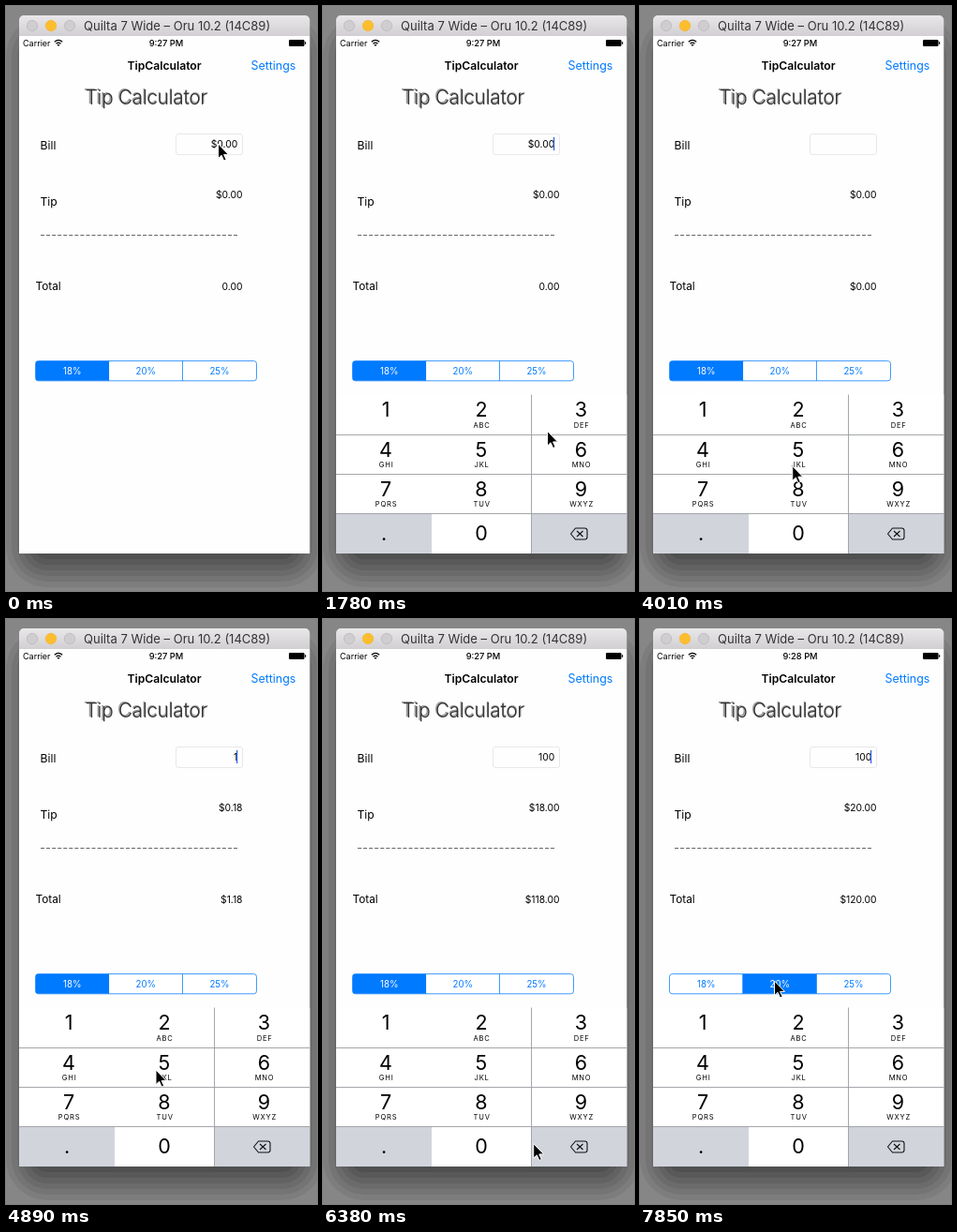
An HTML page for the animation above (8 s loop, 332 by 624 pixels).

```html
<!DOCTYPE html>
<html lang="en">
<head>
<meta charset="utf-8">
<title>Tip Calculator</title>
<style>
  html, body { margin: 0; width: 100%; height: 100%; overflow: hidden; background: #868686; }
  svg { display: block; width: 332px; height: 624px; font-family: Inter, Roboto, sans-serif; }
  .end { text-anchor: end; }
  .mid { text-anchor: middle; }
</style>
</head>
<body>
<svg id="stage" viewBox="0 0 332 624"></svg>
<script>
const LOOP = 8000, START = 600, TICK = 147.96;
const BLUE = '#007aff', KEY_GRAY = '#d1d4db';

const text = (x, y, size, str, attrs = '') =>
  `<text x="${x}" y="${y}" font-size="${size}" ${attrs}>${str}</text>`;
const rect = (x, y, w, h, fill, attrs = '') =>
  `<rect x="${x}" y="${y}" width="${w}" height="${h}" fill="${fill}" ${attrs}/>`;
const line = (d, stroke, attrs = '') =>
  `<path d="${d}" stroke="${stroke}" fill="none" ${attrs}/>`;

// Banded drop shadow around the window
function shadow() {
  let out = '';
  for (let k = 5; k >= 0; k--) {
    const s = 6 * k, g = 80 + 9 * k;
    out += rect(30 - s, 40 - s, 279 + 2 * s, 550 + 2 * s, `rgb(${g},${g},${g})`, `rx="${14 + s}"`);
  }
  return out;
}

function titleBar() {
  const lights = [[28, '#cfcdcf', '#b9b7b9'], [48, '#fdbe2e', '#f3b32c'], [68, '#cfcdcf', '#b9b7b9']];
  return `<path d="M14 32V15a5 5 0 0 1 5-5H319.3a5 5 0 0 1 5 5V32Z" fill="url(#bar)"/>` +
    lights.map(([x, fill, edge]) =>
      `<circle cx="${x}" cy="21" r="5.7" fill="${fill}" stroke="${edge}" stroke-width=".7"/>`).join('') +
    text(83, 25.7, 13, 'Quilta 7 Wide – Oru 10.2 (14C89)', 'fill="#333"');
}

function statusBar() {
  return text(18, 43, 9, 'Carrier') +
    line('M51.8 38.3Q56 34.6 60.2 38.3M53.5 40.2Q56 38 58.5 40.2', '#000', 'stroke-width="1.2"') +
    '<path d="M54.5 41.3Q56 40.2 57.5 41.3L56 43Z"/>' +
    text(171, 43, 9.3, '', 'id="clock" class="mid" font-weight="500"') +
    rect(302, 36, 16.5, 7, '#000', 'rx="1.2"') + rect(319, 38.3, 1.2, 2.4, '#000');
}

function page() {
  const title = (x, y, attrs) => text(x, y, 20.8, 'Tip Calculator', `letter-spacing="-.3" ${attrs}`);
  return text(169, 68, 12.2, 'TipCalculator', 'class="mid" font-weight="600"') +
    text(309.3, 68, 12.4, 'Settings', `class="end" fill="${BLUE}"`) +
    title(82.9, 104, 'fill="#9c9c9c"') + title(84.7, 104.8, 'fill="#333" font-weight="300"') +
    text(36.5, 152.5, 12.2, 'Bill') + text(36.5, 212.7, 12.2, 'Tip') + text(31.5, 303, 11.8, 'Total') +
    rect(181.5, 136.5, 71, 22, '#fefefe', 'rx="2.5" stroke="#e8e8e8"') +
    text(247.3, 151, 10.3, '', 'id="bill" class="end"') +
    rect(246, 140, 1.2, 14, '#2d5fe6', 'id="caret"') +
    text(252.5, 205, 10.3, '', 'id="tip" class="end"') +
    text(252.5, 302.5, 10.3, '', 'id="total" class="end"') +
    line('M37 244.5H247', '#666', 'stroke-dasharray="4 2.06"');
}

const segments = [[31.5, 78.5, '18%'], [110, 78.5, '20%'], [188.5, 79, '25%']];
function segmentedControl() {
  return '<g clip-path="url(#segClip)">' +
    segments.map(([x, w], i) => rect(x, 378.6, w, 21.2, '#fff', `id="seg${i}"`)).join('') + '</g>' +
    rect(31.5, 378.6, 236, 21.2, 'none', `rx="3" stroke="${BLUE}" stroke-width=".75"`) +
    line('M109.6 378.6V399.8M188.5 378.6V399.8', BLUE, 'stroke-width=".75"') +
    segments.map(([x, w, s], i) => text(x + w / 2, 393, 9.7, s, `id="pct${i}" class="mid"`)).join('');
}

const letters = ['', 'ABC', 'DEF', 'GHI', 'JKL', 'MNO', 'PQRS', 'TUV', 'WXYZ'];
const columns = [[14, 102, 67], [116, 106.5, 169], [222.5, 102.5, 275.5]];
const keyFill = key => key === '.' || key === 'del' ? KEY_GRAY : '#fff';
const keys = ['1', '2', '3', '4', '5', '6', '7', '8', '9', '.', '0', 'del'];
function keyboard() {
  let out = '';
  keys.forEach((key, i) => {
    const [x, w, mid] = columns[i % 3], top = 414.5 + 42.3 * Math.floor(i / 3);
    out += rect(x, top, w, 42.8, keyFill(key), `id="key-${key}"`);
    if (key !== 'del') out += text(mid - (key === '.' ? 2 : 0), top + (i < 9 ? 23.7 : 29), 21.5, key, 'class="mid"');
    if (letters[i]) out += text(mid + .6, top + 35.2, 7.6, letters[i], 'class="mid" letter-spacing=".8"');
  });
  return out +
    line('M14 457.5H325M14 499.5H325M14 541.5H325M222.5 414.5V584', '#9b9da1', 'stroke-width=".9"') +
    line('M264.5 563L269.5 557H279.5Q282 557 282 559.5V566.5Q282 569 279.5 569H269.5ZM271 560L277.5 566M277.5 560L271 566',
      '#111', 'stroke-width="1.1" stroke-linejoin="round"');
}

document.getElementById('stage').innerHTML = `
  <defs>
    <linearGradient id="bar" x2="0" y2="1"><stop stop-color="#e9e7e9"/><stop offset="1" stop-color="#d1cfd1"/></linearGradient>
    <clipPath id="segClip"><rect x="31.5" y="378.6" width="236" height="21.2" rx="3"/></clipPath>
    <clipPath id="screen"><rect x="14" y="32" width="310.3" height="552"/></clipPath>
  </defs>
  ${rect(0, 0, 332, 624, '#868686')}${shadow()}${titleBar()}
  ${rect(14, 32, 310.3, 552, '#fefefe')}
  ${statusBar()}${page()}${segmentedControl()}
  <g clip-path="url(#screen)"><g id="keyboard">${keyboard()}</g></g>
  <path id="pointer" d="M0 0V15.6L3.6 12.3L6.1 18L8.6 16.9L6.1 11.4H11Z" stroke="#fff" stroke-width="1"/>`;

const tracks = {
  bill: [[-1, '$0.00'], [11, '$0.001'], [14, '$0.00'], [15, '$0.0'], [16, '$0.'], [17, '$0'],
    [18, '$'], [19, ''], [26, '1'], [33, '10'], [35, '100']],
  key: [[-1, ''], [14, 'del'], [15, ''], [16, 'del'], [17, ''], [18, 'del'], [20, ''],
    [25, '1'], [26, ''], [32, '0'], [33, ''], [34, '0'], [35, '']],
  slide: [[-1, 172], [0, 140], [1, 48], [2, 8], [3, 0]],
  clock: [[-1, '9:27 PM'], [42, '9:28 PM']],
};
const caretFlips = [0, 4, 7, 10, 11, 22, 25, 30, 32, 39, 42, 45, 48];
const pointerPath = [[-1, 226.5, 147], [3, 226.5, 147], [8, 239.5, 453.5], [11, 66, 434], [14, 257.5, 549.5],
  [21, 257.5, 549.5], [25, 68, 432], [26, 68, 432], [29, 160, 481], [32, 178, 565], [38, 178, 565],
  [39, 224.7, 559.5], [46, 143.5, 386], [49, 143.5, 386]];

const $ = id => document.getElementById(id);
const at = (name, tick) => tracks[name].findLast(step => step[0] <= tick)[1];
const money = n => '$' + n.toFixed(2);

function pointerAt(tick) {
  const i = pointerPath.findLastIndex(p => p[0] <= tick);
  const a = pointerPath[i], b = pointerPath[i + 1] || a;
  const p = b === a ? 0 : (tick - a[0]) / (b[0] - a[0]);
  const e = p * p * (3 - 2 * p);
  return [a[1] + (b[1] - a[1]) * e, a[2] + (b[2] - a[2]) * e];
}

function render(time) {
  const tick = time < START ? -1 : Math.floor((time - START) / TICK + .08);
  const bill = at('bill', tick), pressed = at('key', tick);
  const selected = tick < 47 ? 0 : 1;
  const amount = Number(bill) || 0, tip = amount * [.18, .2][selected];

  $('clock').textContent = at('clock', tick);
  $('bill').textContent = bill;
  $('tip').textContent = money(tip);
  $('total').textContent = tick < 11 ? '0.00' : money(amount + tip);
  $('caret').setAttribute('opacity', caretFlips.filter(f => f <= tick).length % 2);
  segments.forEach((_, i) => {
    const touched = i === 1 && tick === 46;
    $('seg' + i).setAttribute('fill', i === selected ? BLUE : touched ? '#d9ebff' : '#fff');
    $('pct' + i).setAttribute('fill', i === selected ? '#fff' : BLUE);
  });
  keys.forEach(key => {
    const fill = key !== pressed ? keyFill(key) : key === 'del' ? '#fff' : KEY_GRAY;
    $('key-' + key).setAttribute('fill', fill);
  });
  $('keyboard').setAttribute('transform', `translate(0 ${at('slide', tick)})`);
  $('pointer').setAttribute('transform', `translate(${pointerAt(tick)})`);
}

const origin = performance.now();
function loop() {
  render((performance.now() - origin) % LOOP);
  requestAnimationFrame(loop);
}
loop();
</script>
</body>
</html>
```
